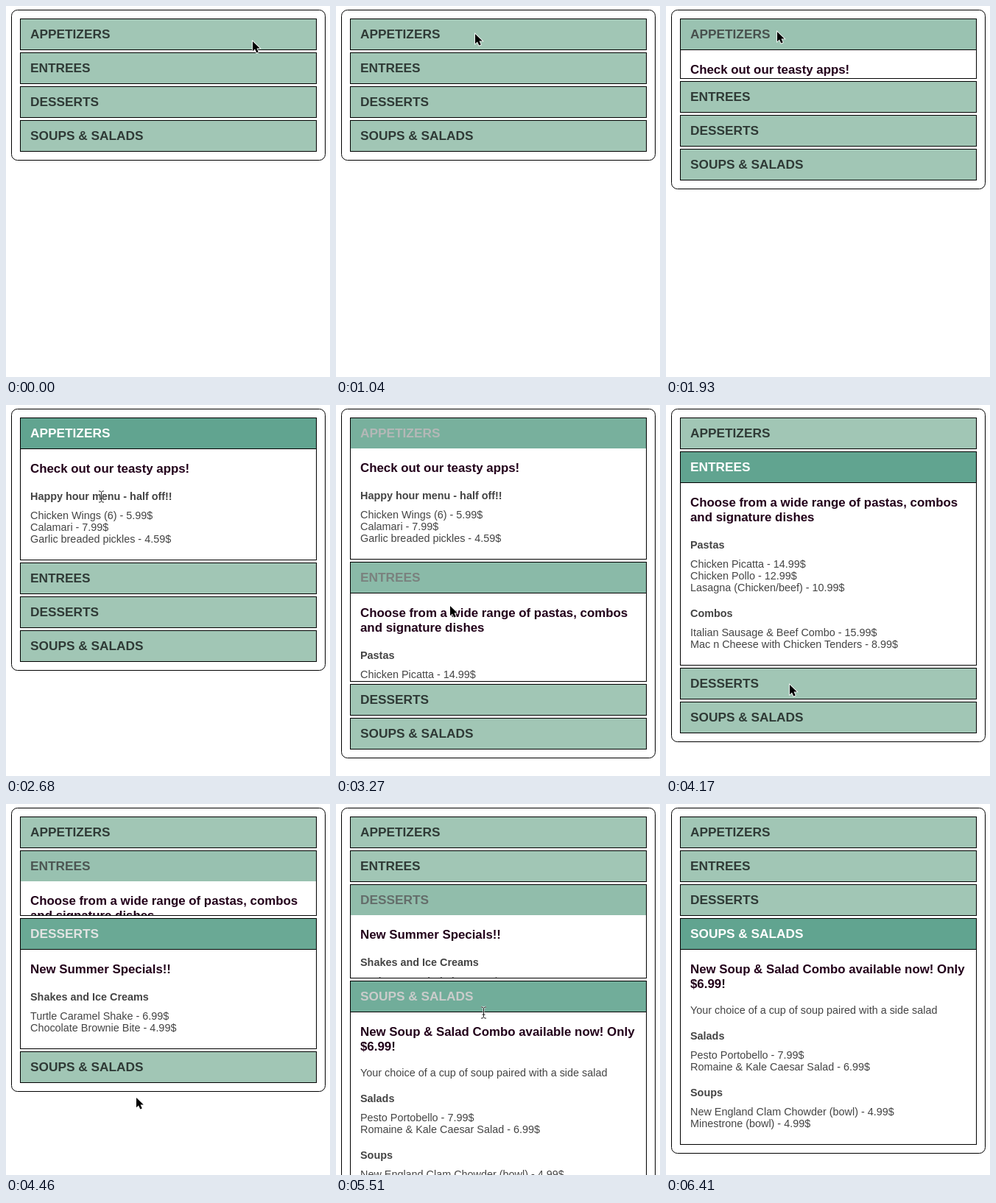
An HTML page for the animation above (7020 ms loop, 440x504 px).

```html
<!DOCTYPE html>
<html lang="en">
<head>
<meta charset="utf-8">
<title>Menu accordion</title>
<style>
  html, body { margin: 0; width: 100%; height: 100%; overflow: hidden; background: #fff; }
  svg { display: block; }
  text { font-family: "Liberation Sans", Arial, sans-serif; white-space: pre; }
  .title { font-size: 17.28px; font-weight: bold; }
  .lead { font-size: 16.85px; font-weight: bold; fill: #22001a; }
  .sub { font-size: 14.4px; font-weight: bold; fill: #444; }
  .body { font-size: 14.4px; fill: #444; }
  .edge { fill: none; stroke: #000; }
</style>
</head>
<body>
<svg id="stage" width="100%" height="100%" viewBox="0 0 440 504"></svg>
<script>
const LOOP = 7020, STEP = 149;
const SLIDE = 500, MAX_HEIGHT = 330;
const HEADER = 42, GAP = 3, TOP = 17;
const BG = [[161, 198, 181], [97, 164, 144]];
const INK = [[47, 58, 54], [255, 255, 255]];

// Lines: [kind, baseline inside the panel, text]
const sections = [
  { title: "APPETIZERS", open: 1881, close: 3164, full: 150, lines: [
    ["lead", 32, "Check out our teasty apps!"],
    ["sub", 69, "Happy hour menu - half off!!"],
    ["body", 95, "Chicken Wings (6) - 5.99$"],
    ["body", 111, "Calamari - 7.99$"],
    ["body", 127, "Garlic breaded pickles - 4.59$"]] },
  { title: "ENTREES", open: 3164, close: 4187, full: 247, lines: [
    ["lead", 32, "Choose from a wide range of pastas, combos"],
    ["lead", 52, "and signature dishes"],
    ["sub", 89, "Pastas"],
    ["body", 115, "Chicken Picatta - 14.99$"],
    ["body", 131, "Chicken Pollo - 12.99$"],
    ["body", 147, "Lasagna (Chicken/beef) - 10.99$"],
    ["sub", 182, "Combos"],
    ["body", 208, "Italian Sausage & Beef Combo - 15.99$"],
    ["body", 224, "Mac n Cheese with Chicken Tenders - 8.99$"]] },
  { title: "DESSERTS", open: 4187, close: 5290, full: 134, lines: [
    ["lead", 32, "New Summer Specials!!"],
    ["sub", 69, "Shakes and Ice Creams"],
    ["body", 95, "Turtle Caramel Shake - 6.99$"],
    ["body", 111, "Chocolate Brownie Bite - 4.99$"]] },
  { title: "SOUPS & SALADS", open: 5290, close: Infinity, full: 264, lines: [
    ["lead", 32, "New Soup & Salad Combo available now! Only"],
    ["lead", 52, "$6.99!"],
    ["body", 87, "Your choice of a cup of soup paired with a side salad"],
    ["sub", 122, "Salads"],
    ["body", 148, "Pesto Portobello - 7.99$"],
    ["body", 164, "Romaine & Kale Caesar Salad - 6.99$"],
    ["sub", 199, "Soups"],
    ["body", 225, "New England Clam Chowder (bowl) - 4.99$"],
    ["body", 241, "Minestrone (bowl) - 4.99$"]] }
];

// Pointer path: [time, x, y]
const path = [
  [0, 334, 47], [298, 300, 53], [596, 255, 48], [894, 205, 39], [1192, 171, 35],
  [1341, 150, 34], [2533, 150, 34], [2682, 129, 124], [3000, 146, 226], [3180, 150, 236],
  [3576, 166, 383], [3725, 166, 379], [3874, 166, 377], [4023, 166, 377],
  [4172, 167, 379], [4470, 176, 398], [4900, 186, 350], [5290, 196, 306],
  [5513, 200, 283], [5960, 290, 350], [6258, 361, 434]
];
const beamSpans = [[2600, 2900], [5450, 5900]];
const HIDE_AT = 6400;

const stage = document.getElementById("stage");

function add(parent, tag, attrs, text) {
  const el = document.createElementNS("http://www.w3.org/2000/svg", tag);
  set(el, attrs);
  if (text) el.textContent = text;
  return parent.appendChild(el);
}

function set(el, attrs) {
  for (const name in attrs) el.setAttribute(name, attrs[name]);
}

const lerp = (a, b, p) => a + (b - a) * p;
const mix = ([from, to], p) => `rgb(${from.map((v, i) => Math.round(lerp(v, to[i], p)))})`;

// CSS "ease": cubic-bezier(.25, .1, .25, 1)
function ease(x) {
  if (x <= 0) return 0;
  if (x >= 1) return 1;
  const curve = (s, a, b) => 3 * (1 - s) ** 2 * s * a + 3 * (1 - s) * s * s * b + s ** 3;
  let lo = 0, hi = 1;
  for (let i = 0; i < 24; i++) {
    const mid = (lo + hi) / 2;
    if (curve(mid, .25, .25) < x) lo = mid; else hi = mid;
  }
  return curve(lo, .1, 1);
}

const frame = add(stage, "rect", { class: "edge", x: 7.5, y: 5.5, width: 426, rx: 8 });

for (const s of sections) {
  s.group = add(stage, "g", {});
  s.head = add(s.group, "rect", { x: 20, y: 1, width: 401, height: HEADER - 1 });
  s.label = add(s.group, "text", { class: "title", x: 33, y: 27 }, s.title);
  s.rule = add(s.group, "path", { class: "edge", d: `M20 ${HEADER + .5}H421` });
  s.panel = add(s.group, "svg", { x: 20, width: 401 });
  for (const [kind, y, text] of s.lines) add(s.panel, "text", { class: kind, x: 13, y }, text);
  s.box = add(s.group, "rect", { class: "edge", x: 19.5, y: .5, width: 402 });
}

const arrow = add(stage, "path", {
  d: "M1 1V14.2L4 11.4L6.3 16.6L8.8 15.5L6.5 10.4H10.8Z",
  fill: "#000", stroke: "#fff", "stroke-width": 1.6, "paint-order": "stroke"
});
const beam = add(stage, "g", { fill: "none" });
const beamShape = "M-3.5 -7.5H-1.5L0 -6L1.5 -7.5H3.5M0 -6V6M-3.5 7.5H-1.5L0 6L1.5 7.5H3.5M-2 2.5H2";
add(beam, "path", { d: beamShape, stroke: "#fff", "stroke-width": 2.4, "stroke-opacity": .7 });
add(beam, "path", { d: beamShape, stroke: "#222" });

function pointerAt(t) {
  const i = path.findIndex(k => k[0] > t);
  if (i < 0) return path[path.length - 1].slice(1);
  const [t0, x0, y0] = path[i - 1], [t1, x1, y1] = path[i];
  const p = (t - t0) / (t1 - t0);
  return [Math.round(lerp(x0, x1, p)), Math.round(lerp(y0, y1, p))];
}

function drawSections(t) {
  let y = TOP;
  for (const s of sections) {
    const active = t >= s.open && t < s.close;
    const p = t < s.close ? ease((t - s.open) / SLIDE) : 1 - ease((t - s.close) / SLIDE);
    const height = Math.min(s.full, Math.round(MAX_HEIGHT * p));
    const panelTop = HEADER + (active ? 1 : 0);
    const total = panelTop + height + 1;
    set(s.group, { transform: `translate(0 ${y})` });
    set(s.head, { fill: mix(BG, p) });
    set(s.label, { fill: mix(INK, p) });
    set(s.rule, { visibility: active ? "visible" : "hidden" });
    set(s.panel, { y: panelTop, height, visibility: height ? "visible" : "hidden" });
    set(s.box, { height: total - 1 });
    y += total + GAP;
  }
  set(frame, { height: y - GAP + 11 - 5 });
}

function drawPointer(t) {
  const shown = t < HIDE_AT;
  const onText = beamSpans.some(([a, b]) => t >= a && t < b);
  const transform = `translate(${pointerAt(t)})`;
  set(arrow, { transform, visibility: shown && !onText ? "visible" : "hidden" });
  set(beam, { transform: transform + " translate(.5 .5)", visibility: shown && onText ? "visible" : "hidden" });
}

function render(ms) {
  const t = Math.floor(ms / STEP + .08) * STEP;
  drawSections(t);
  drawPointer(t);
}

const start = performance.now();
function tick() {
  render((performance.now() - start) % LOOP);
  requestAnimationFrame(tick);
}
tick();
</script>
</body>
</html>
```
